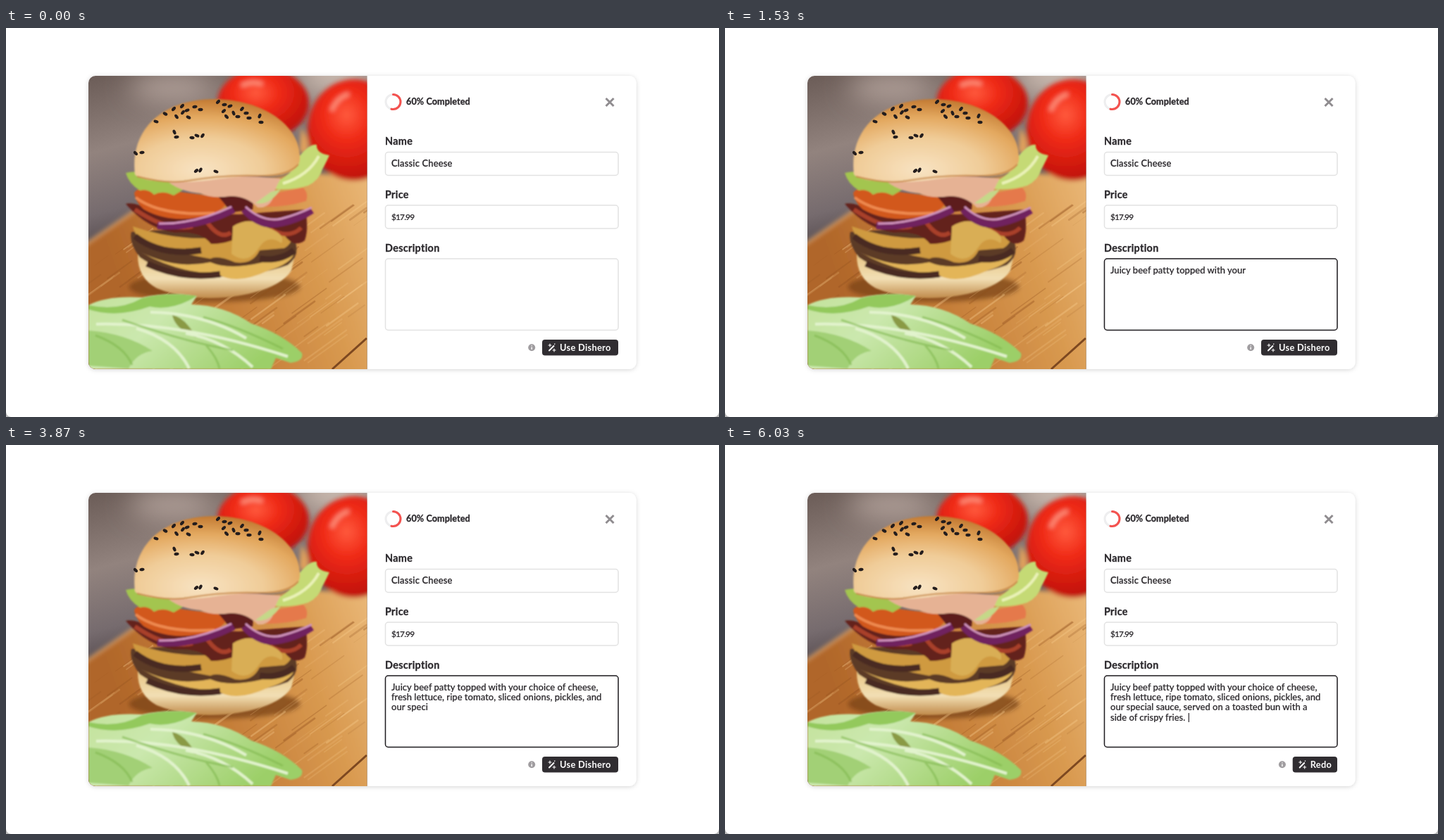
These frames come from a looping animation (1012x553 px, 6970 ms). An HTML page:

```html
<!DOCTYPE html>
<html lang="en">
<head>
<meta charset="utf-8">
<title>Menu item form</title>
<style>
  html, body { margin: 0; width: 100%; height: 100%; overflow: hidden; background: #b9b9b9; }
  svg { display: block; width: 1012px; height: 553px; }
  text { font-family: Lato, "Open Sans", sans-serif; fill: #2b282c; }
  .label { font-weight: 700; font-size: 14.4px; letter-spacing: .3px; stroke: #2b282c; stroke-width: .3px; }
  .body { font-weight: 500; font-size: 13px; letter-spacing: .02px; stroke: #2b282c; stroke-width: .2px; }
  .btn { font-weight: 700; font-size: 12.8px; letter-spacing: .3px; fill: #fff; }
  .field { fill: #fff; stroke: #e2e2e2; stroke-width: 1.5; }
</style>
</head>
<body>
<svg viewBox="0 0 1012 553">
  <defs>
    <clipPath id="photoClip"><path d="M512.500 68H127a10 10 0 0 0-10 10V475a10 10 0 0 0 10 10H512.500Z"/></clipPath>
    <clipPath id="btnClip"><rect id="btnClipBox" y="443" height="22.5" rx="4"/></clipPath>
    <filter id="shadow" x="-5%" y="-5%" width="110%" height="112%">
      <feDropShadow dx="0" dy="1" stdDeviation="3" flood-color="#000" flood-opacity=".17"/>
    </filter>
    <filter id="haze" x="-50%" y="-50%" width="200%" height="200%"><feGaussianBlur stdDeviation="18"/></filter>
    <filter id="soft"><feGaussianBlur stdDeviation="3"/></filter>
    <filter id="fine"><feGaussianBlur stdDeviation=".8"/></filter>
    <linearGradient id="wall" x2=".25" y2="1">
      <stop stop-color="#6b5c57"/><stop offset=".25" stop-color="#92837e"/>
      <stop offset=".45" stop-color="#766b6e"/><stop offset=".62" stop-color="#463c40"/>
    </linearGradient>
    <linearGradient id="wood" x2="1" y2="-.25">
      <stop stop-color="#b0662a"/><stop offset=".3" stop-color="#c47c37"/>
      <stop offset=".65" stop-color="#d99a50"/><stop offset="1" stop-color="#efc184"/>
    </linearGradient>
    <radialGradient id="red" cx=".42" cy=".35" r=".7">
      <stop stop-color="#ff5a3d"/><stop offset=".35" stop-color="#f02b18"/><stop offset="1" stop-color="#b90d07"/>
    </radialGradient>
    <radialGradient id="bun" cx=".4" cy=".85" r=".85">
      <stop stop-color="#f8e3c2"/><stop offset=".45" stop-color="#f0cc98"/>
      <stop offset=".75" stop-color="#e3a85f"/><stop offset="1" stop-color="#c37a32"/>
    </radialGradient>
    <linearGradient id="base" x2="0" y2="1">
      <stop stop-color="#e6c07a"/><stop offset=".6" stop-color="#f2dfb4"/><stop offset="1" stop-color="#c08a4a"/>
    </linearGradient>
    <linearGradient id="leaf" x2="1" y2=".4">
      <stop stop-color="#c4e29c"/><stop offset=".4" stop-color="#cbe8ae"/><stop offset="1" stop-color="#9ccf68"/>
    </linearGradient>
  </defs>

  <path d="M0 0H1012V546q-1 6-7 7H7q-6-1-7-7Z" fill="#fff"/>
  <rect x="117" y="68" width="777.5" height="417" rx="10" fill="#fff" filter="url(#shadow)"/>

  <g clip-path="url(#photoClip)">
    <rect x="117" y="68" width="396" height="417" fill="url(#wall)"/>
    <g filter="url(#haze)">
      <ellipse cx="235" cy="85" rx="60" ry="18" fill="#b5a49d"/>
      <ellipse cx="465" cy="68" rx="55" ry="22" fill="#d3c3b8"/>
    </g>
    <g filter="url(#soft)">
      <path d="M105 313L190 256L420 204L525 214V500H105Z" fill="url(#wood)"/>
      <path d="M105 313L185 258" stroke="#e0a468" stroke-width="3"/>
      <ellipse cx="365" cy="107" rx="65" ry="50" fill="url(#red)"/>
      <ellipse cx="494" cy="145" rx="66" ry="72" fill="url(#red)"/>
      <path d="M334 82q16-8 30-2M462 118q8-20 25-24" fill="none" stroke="#ffa28c" stroke-width="6" opacity=".8"/>
      <path d="M419 142q14 18 9 38l-12-4Z" fill="#e0a05c"/>
      <ellipse cx="296" cy="368" rx="122" ry="22" fill="#7a4319" opacity=".75"/>
    </g>
    <g id="grain" fill="none" stroke-linecap="round"></g>
    <path d="M463 485L512 441" stroke="#7d4820" stroke-width="3"/>

    <g filter="url(#fine)">
      <path d="M187 321Q186 355 214 370Q258 388 312 383Q385 375 405 345L412 315Z" fill="url(#base)"/>
      <path d="M178 290Q174 305 190 326Q235 357 290 354Q360 352 400 337Q420 322 408 298L350 280Z" fill="#5b3a28"/>
      <path d="M180 282Q240 303 300 298L412 282Q407 307 395 313L360 316Q350 337 325 333Q300 322 290 328Q250 321 214 311Q185 305 180 282Z" fill="#cf9a40"/>
      <path d="M190 318Q240 344 290 333Q330 350 410 318Q406 335 372 345Q325 367 300 349Q245 349 190 318Z" fill="#e3b558"/>
      <path d="M183 296Q220 325 277 316M360 328Q390 332 409 316M200 335Q250 358 304 350" fill="none" stroke="#4a2c20" stroke-width="9"/>
      <path d="M170 250Q181 246 214 262L330 265L425 258Q430 286 424 302Q408 314 394 293Q360 289 343 292Q314 308 291 307Q276 288 240 291Q200 285 170 250Z" fill="#64201a"/>
      <path d="M183 258Q230 290 265 282M284 274Q303 302 319 291M375 286Q402 301 419 284" fill="none" stroke="#a94129" stroke-width="6"/>
      <path d="M322 282Q345 267 367 282Q398 292 391 306Q371 292 358 314Q342 338 320 321Z" fill="#d9ae55"/>
      <path d="M182 235Q185 225 220 229L310 242Q319 253 290 266Q235 280 196 258Q184 248 182 235Z" fill="#d2581f"/>
      <path d="M184 241Q220 268 296 263" fill="none" stroke="#ee8a50" stroke-width="4"/>
      <path d="M300 238H352L350 258L320 262Z" fill="#5d1d1b"/>
      <path d="M350 241L422 227Q430 236 426 246Q390 257 354 253Z" fill="#e5794b"/>
      <path d="M215 281Q270 285 323 258M338 258Q362 285 391 277Q415 272 434 259" fill="none" stroke="#70205f" stroke-width="10"/>
      <path d="M217 278Q268 279 320 254M340 254Q365 277 391 271Q414 265 434 255" fill="none" stroke="#d294bf" stroke-width="3"/>
      <path d="M170 206Q190 200 228 214L253 229L238 238Q222 230 210 237Q202 228 190 231Q174 221 170 206Z" fill="#a3c550"/>
      <path d="M383 219Q414 203 416 183Q431 164 441 166Q440 178 459 181Q453 194 449 201Q445 216 429 224Q407 231 383 229Z" fill="#c5da74"/>
      <path d="M393 221Q429 210 444 182" fill="none" stroke="#eaf2b8" stroke-width="4"/>
      <path d="M228 217Q310 206 390 214Q380 231 378 244Q371 257 357 255Q342 239 319 239Q292 243 276 235Q247 233 228 217Z" fill="#e6b294"/>
      <path d="M354 249Q374 253 390 229L376 233Z" fill="#c5d889"/>
      <path d="M183 208C176 150 215 102 295 101C368 101 421 142 417 188C414 207 388 212 358 211C318 209 286 220 245 219C211 219 188 215 183 208Z" fill="url(#bun)"/>
      <path d="M186 211Q224 221 252 218Q310 208 358 210Q399 211 415 194" fill="none" stroke="#c98a48" stroke-width="2"/>
    </g>
    <g id="seeds" fill="#241d1d"></g>

    <g filter="url(#fine)">
      <path d="M117 394Q143 380 193 383Q233 374 271 381L263 393Q310 394 348 420Q393 435 420 462Q423 474 404 476L383 469L376 485H117Z" fill="url(#leaf)"/>
      <path d="M117 394Q160 403 193 384Q230 375 271 381Q236 403 204 396Q157 413 117 400Z" fill="#93c95c"/>
      <path d="M236 408Q255 412 270 440Q240 428 236 408Z" fill="#8a9a44"/>
      <path d="M117 430Q170 434 208 459Q185 462 174 484L117 480Z" fill="#a2d076"/>
      <path d="M128 421Q250 418 400 467M205 404Q280 405 341 441M185 427Q240 443 260 484M255 434Q310 444 350 482" fill="none" stroke="#e2f3cd" stroke-width="4"/>
      <path d="M165 415Q254 446 322 458M280 411Q329 424 393 456M127 437Q168 452 179 479M284 451Q300 469 303 484" fill="none" stroke="#7fb84e" stroke-width="3" opacity=".6"/>
    </g>
  </g>

  <g fill="none" stroke-width="3">
    <circle cx="549.5" cy="105" r="10.5" stroke="#eeeeef"/>
    <circle cx="549.5" cy="105" r="10.5" stroke="#f4524f" pathLength="100" stroke-dasharray="54 46" transform="rotate(-90 549.5 105)" stroke-linecap="round"/>
    <path d="M851.5 100l11 11m0-11l-11 11" stroke="#908d90"/>
  </g>
  <text class="label" x="568" y="109" style="font-size:12.7px;letter-spacing:.05px">60% Completed</text>
  <text class="label" x="538" y="166">Name</text>
  <text class="label" x="538" y="242">Price</text>
  <text class="label" x="538" y="318">Description</text>
  <rect class="field" x="538.5" y="176.5" width="330.5" height="33" rx="4"/>
  <rect class="field" x="538.5" y="252" width="330.5" height="33" rx="4"/>
  <rect class="field" x="538.5" y="328" width="330.5" height="101.5" rx="4"/>
  <rect id="focus" class="field" x="538.5" y="328" width="330.5" height="101.5" rx="4" style="stroke:#1f1c20"/>
  <text class="body" x="547" y="197" style="letter-spacing:.15px;stroke-width:.3px">Classic Cheese</text>
  <text class="body" x="547" y="273" style="font-size:12px;letter-spacing:-.9px">$17.99</text>
  <g id="copy"></g>

  <g clip-path="url(#btnClip)">
    <rect x="761" y="443" width="108" height="23" fill="#302d31"/>
    <g id="face">
      <path d="M10 458.500l6.500-6.500" stroke="#fff" stroke-width="2" stroke-linecap="round"/>
      <path d="M11 449v4m-2-2h4M17 456v4m-2-2h4M17.500 449.500l.5-.5" stroke="#fff" stroke-width="1.100" stroke-linecap="round"/>
      <text id="before" class="btn" x="25" y="458.500">Use Dishero</text>
      <text id="after" class="btn" x="25" y="458.500">Redo</text>
    </g>
  </g>
  <g id="info">
    <circle cx="-14.800" cy="454.300" r="5" fill="#a09da0"/>
    <path d="M-14.800 453.500v3.500m0-5.800v1" stroke="#fff" stroke-width="1.400"/>
  </g>
</svg>
<script>
const $ = id => document.getElementById(id);
const LOOP = 6970;

// text, start and duration of each typed line
const lines = [
  ["Juicy beef patty topped with your choice of cheese,", 1367, 700],
  ["fresh lettuce, ripe tomato, sliced onions, pickles, and", 2667, 700],
  ["our special sauce, served on a toasted bun with a", 3837, 570],
  ["side of crispy fries. |", 4967, 330]
];

function add(parent, tag, attrs) {
  const el = document.createElementNS("http://www.w3.org/2000/svg", tag);
  for (const k in attrs) el.setAttribute(k, attrs[k]);
  return parent.appendChild(el);
}

let seed = 7;
const rnd = () => (seed = seed * 16807 % 2147483647) / 2147483647;

for (let i = 0; i < 110; i++) {
  const x = 130 + rnd() * 400, y = Math.max(240, 300 - (x - 117) * .22) + rnd() * 220, n = 15 + rnd() * 45;
  add($("grain"), "path", {
    d: `M${x} ${y}l${-n} ${n * .72}`,
    stroke: rnd() < .5 ? "#8f4e1c" : "#f5ca8c",
    "stroke-width": .8 + rnd() * 2, opacity: .12 + rnd() * .25
  });
}

const seedSpots = [
  [213, 133], [226, 122], [238, 115], [242, 126], [250, 111], [257, 117], [259, 127], [268, 112], [276, 116],
  [239, 148], [242, 155], [264, 156], [271, 153], [279, 153], [301, 105], [309, 118], [313, 126], [318, 111],
  [323, 121], [329, 126], [335, 115], [341, 121], [345, 128], [360, 125], [362, 134], [184, 178], [193, 177],
  [270, 203], [276, 202], [298, 204], [310, 109], [251, 120]
];
for (const [x, y] of seedSpots)
  add($("seeds"), "ellipse", { rx: 3.6, ry: 2.2, transform: `translate(${x} ${y}) rotate(${rnd() * 140 - 70})` });

const rows = lines.map((_, i) => add($("copy"), "text", { class: "body", x: 547, y: 348.6 + i * 14.3 }));

const clamp = v => Math.min(1, Math.max(0, v));
const easeOut = (t, start, ms, power) => 1 - (1 - clamp((t - start) / ms)) ** power;

function draw(now) {
  // the motion advances at 30 steps a second
  const t = Math.floor((now % LOOP + 4) * .03) / .03;

  lines.forEach(([text, start, ms], i) => {
    rows[i].textContent = text.slice(0, Math.round(text.length * easeOut(t, start, ms, 4)));
  });
  $("focus").style.opacity = clamp((t - 1367) / 100);

  const p = easeOut(t, 4967, 625, 3), left = 761 + 44.7 * p;
  $("btnClipBox").setAttribute("x", left);
  $("btnClipBox").setAttribute("width", 869 - left);
  for (const id of ["face", "info"]) $(id).setAttribute("transform", `translate(${left} 0)`);
  $("before").style.opacity = 1 - p;
  $("after").style.opacity = p;
  requestAnimationFrame(draw);
}
requestAnimationFrame(draw);
</script>
</body>
</html>
```
